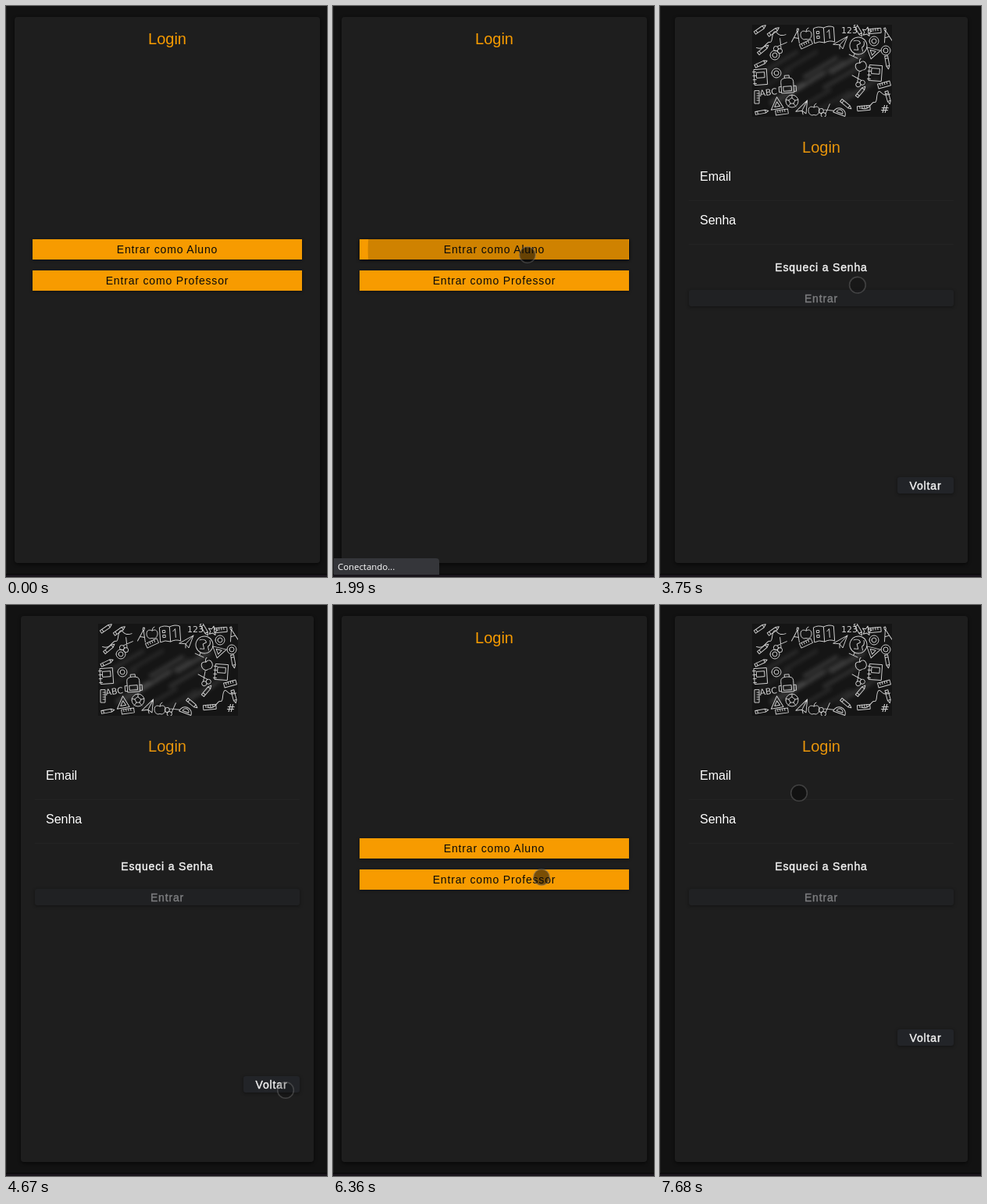
Recreate the animation shown at these times as an HTML page. Size 411 by 732 pixels, loop 8 s.

```html
<!DOCTYPE html>
<html lang="pt">
<head>
<meta charset="utf-8">
<title>Login</title>
<style>
html, body { margin: 0; width: 100%; height: 100%; overflow: hidden; background: #121212; }
svg { display: block; }
text { font-family: "Liberation Sans", Arial, sans-serif; }
.btn { font-size: 14px; letter-spacing: .84px; text-anchor: middle; }
.bold { stroke: currentColor; stroke-width: .4px; fill: currentColor; }
.title { font-size: 20px; text-anchor: middle; }
.field { font-size: 16px; fill: #fff; }
.status { font-family: "Open Sans", "Noto Sans", sans-serif; font-size: 11.4px; fill: #fff; }
.chalk path { fill: none; stroke: #d2d2d2; stroke-width: .95; stroke-linejoin: round; stroke-linecap: round; }
.chalk text { fill: #d2d2d2; font-size: 11px; font-family: "DejaVu Sans", sans-serif; }
</style>
</head>
<body>
<svg id="stage" width="100%" height="100%" viewBox="0 0 411 732">
  <defs>
    <clipPath id="view"><rect width="411" height="728"/></clipPath>
    <clipPath id="board"><rect width="179" height="118"/></clipPath>
    <filter id="shade" x="-20%" y="-60%" width="140%" height="220%"><feGaussianBlur stdDeviation="2"/></filter>
    <filter id="smudge" x="-30%" y="-30%" width="160%" height="160%"><feGaussianBlur stdDeviation="2.4"/></filter>
  </defs>
  <rect width="411" height="732" fill="#121212"/>
  <g id="pages" clip-path="url(#view)"></g>
  <rect width="1" height="728" fill="#1d1d1d"/>
  <rect y="728" width="411" height="1" fill="#070707"/>
  <rect y="729" width="411" height="3" fill="#19151b"/>
  <g id="status">
    <path d="M1 708H132Q136 708 136 712V729H1Z" fill="#35363a"/>
    <text class="status" x="6" y="723">Conectando...</text>
  </g>
  <circle id="cursor" r="10.3" fill="#080808" stroke="#777" stroke-opacity=".42" stroke-width="1.6"/>
</svg>
<script>
const LOOP = 8000;
const $ = id => document.getElementById(id);

function el(parent, tag, attrs, text) {
  const node = document.createElementNS('http://www.w3.org/2000/svg', tag);
  for (const k in attrs) node.setAttribute(k, attrs[k]);
  if (text) node.textContent = text;
  return parent.appendChild(node);
}
const set = (node, attrs) => { for (const k in attrs) node.setAttribute(k, attrs[k]); };
const clamp = v => Math.max(0, Math.min(1, v));
const smooth = v => v * v * (3 - 2 * v);
const lerp = (a, b, p) => a + (b - a) * p;

// CSS-like cubic-bezier timing, solved by bisection
function bezier(x1, y1, x2, y2) {
  const at = (a, b, s) => 3 * a * s * (1 - s) ** 2 + 3 * b * s * s * (1 - s) + s ** 3;
  return x => {
    if (x <= 0 || x >= 1) return clamp(x);
    let lo = 0, hi = 1;
    for (let i = 0; i < 24; i++) {
      const mid = (lo + hi) / 2;
      if (at(x1, x2, mid) < x) lo = mid; else hi = mid;
    }
    return at(y1, y2, lo);
  };
}
const enterEase = bezier(.36, .66, .04, 1);
const rippleEase = bezier(.4, 0, .2, 1);

function page(x, w) {
  const g = el($('pages'), 'g', {});
  el(g, 'rect', { width: 411, height: 728, fill: '#121212' });
  el(g, 'rect', { x, y: 15, width: w, height: 701, rx: 4, fill: '#000', opacity: .55, filter: 'url(#shade)' });
  el(g, 'rect', { x, y: 14, width: w, height: 700, rx: 4, fill: '#1e1e1e' });
  return g;
}

function button(parent, x, y, w, h, label, look) {
  const g = el(parent, 'g', { transform: `translate(${x} ${y})` });
  const shadow = el(g, 'rect', { y: 1, width: w, height: h, fill: '#000', opacity: .4, filter: 'url(#shade)' });
  el(g, 'rect', { width: w, height: h, rx: look.rx, fill: look.fill });
  const box = el(g, 'svg', { width: w, height: h, overflow: 'hidden' });
  const wave = el(box, 'circle', { fill: look.wave, opacity: 0 });
  el(g, 'text', { class: 'btn ' + look.css, x: w / 2, y: h / 2 + 5, fill: look.ink, color: look.ink }, label);
  return { g, x, y, w, h, shadow, wave };
}

// Blackboard banner
const shapes = {
  pencil: 'M-8-2H5L9 0 5 2H-8ZM-5-2V2M5-2V2',
  ruler: 'M-8-3H8V3H-8ZM-5-3V0M-2-3V0M1-3V0M4-3V0',
  compass: 'M-5 9L0-6 5 9M-3 3H3M-1-6V-9H1V-6',
  apple: 'M0-3C-9-8-9 7-2 7Q0 6 2 7C9 7 9-8 0-3Q0-7 3-8',
  book: 'M0-9Q-7-12-13-9V10Q-7 7 0 10 7 7 13 10V-9Q7-12 0-9V10M-9-5h3v3h-3zM-9 1h3v3h-3zM4-3L7-6V5',
  note: 'M-8-10H8V10H-8ZM-5-6H5V1H-5ZM-10-7h4M-10-2h4M-10 3h4M-10 8h4',
  ball: 'M-8 0A8 8 0 1 1 8 0 8 8 0 1 1-8 0M0-4L4-1 2 3H-2L-4-1ZM0-8V-4M8-2 4-1M5 7 2 3M-5 7-2 3M-8-2-4-1',
  globe: 'M-11 0A11 11 0 1 1 11 0 11 11 0 1 1-11 0M-8-3Q-3-8 1-4L-2 0 2 5-3 7M4-8Q8-3 5 0L8 4M0 11V15M-6 15H6',
  pack: 'M-8 10V-4Q-8-9 0-9T8-4V10ZM-5 2H5V8H-5ZM-3-9V-12H3V-9M-8 2h-3v7h3M8 2h3v7h-3',
  scissors: 'M-5-8 3 3M5-8-3 3M3 3a3 3 0 1 0 3 3 3 3 0 0 0-3-3M-3 3a3 3 0 1 1-3 3 3 3 0 0 1 3-3',
  square: 'M-8 7L2-8 8 7ZM-3 4L1-2 4 4Z',
  plane: 'M-9 2L9-8 3 8-1 3ZM9-8L-1 3V8',
  ring: 'M-6 0A6 6 0 1 1 6 0 6 6 0 1 1-6 0M-3 0A3 3 0 1 1 3 0 3 3 0 1 1-3 0',
  arc: 'M-8 5A8 8 0 0 1 8 5ZM-4 3A4 4 0 0 1 4 3Z',
  star: 'M0-6L2-2 6-2 3 1 4 5 0 3-4 5-3 1-6-2-2-2Z',
  curl: 'M-20 6C-10 12-6 0-2 2S2-8 6-10 8-2 20-4'
};
const spots = {
  pencil: [[10, 6, -35], [27, 9, -35], [14, 32, -40], [11, 50, -25], [12, 112, -10], [120, 102, 40], [136, 7, 60], [173, 48, 80], [139, 86, -50], [174, 93, 75]],
  ruler: [[69, 25, -25], [157, 8, -5], [38, 112, -8], [143, 107, -5], [169, 77, -15], [6, 93, 90]],
  compass: [[57, 14, 10], [172, 13, -15]],
  apple: [[69, 12, 0], [79, 109, 0], [139, 52, -20]],
  book: [[92, 13, -4]],
  note: [[11, 67, -4], [158, 62, 4]],
  ball: [[51, 98, 0]],
  globe: [[136, 27, 25]],
  pack: [[45, 77, -4]],
  scissors: [[36, 27, 30], [136, 70, -25], [95, 110, 60]],
  square: [[31, 101, -10], [156, 34, 70]],
  plane: [[113, 23, 0], [64, 107, -15]],
  ring: [[29, 39, 0], [156, 21, 0], [31, 62, 0], [171, 33, 0]],
  arc: [[113, 110, 20]],
  star: [[147, 9, 10]],
  curl: [[24, 20, -10], [158, 97, -12]]
};

function board(parent) {
  const g = el(parent, 'g', { class: 'chalk', transform: 'translate(118 24)', 'clip-path': 'url(#board)' });
  el(g, 'rect', { width: 179, height: 118, fill: '#151515' });
  const dust = el(g, 'g', { filter: 'url(#smudge)' });
  for (let i = 0; i < 14; i++) {
    const x = 28 + i * 8.5, y = 72 - 26 * Math.sin(i * 1.9);
    el(dust, 'line', {
      x1: x - 22, y1: y + 13, x2: x + 22, y2: y - 13,
      stroke: '#656565', 'stroke-width': 3 + i % 3 * 2, opacity: .22 + i % 4 * .06
    });
  }
  for (const name in spots)
    for (const [x, y, a] of spots[name])
      el(g, 'path', { d: shapes[name], transform: `translate(${x} ${y}) rotate(${a})` });
  el(g, 'text', { x: 114, y: 11 }, '123');
  el(g, 'text', { x: 10, y: 92, transform: 'rotate(-8 10 92)' }, 'ABC');
  el(g, 'text', { x: 164, y: 113, style: 'font-size:14px' }, '#');
}

const home = page(11, 391);
el(home, 'text', { class: 'title', x: 206.5, y: 49, fill: '#f79b00' }, 'Login');
const solid = { fill: '#f79b00', ink: '#0a0a0a', wave: '#000', rx: 0, css: '' };
const student = button(home, 34, 299, 345, 26, 'Entrar como Aluno', solid);
const teacher = button(home, 34, 339, 345, 26, 'Entrar como Professor', solid);

const form = page(19, 375);
board(form);
el(form, 'text', { class: 'title', x: 206.5, y: 188, fill: '#e8950b' }, 'Login');
[['Email', 224], ['Senha', 280]].forEach(([label, y]) => {
  el(form, 'text', { class: 'field', x: 51, y }, label);
  el(form, 'rect', { x: 37, y: y + 25, width: 339, height: 1, fill: '#232323' });
});
el(form, 'text', { class: 'btn bold', x: 206.5, y: 340, color: '#f4f4f4' }, 'Esqueci a Senha');
const dark = { fill: '#222428', ink: '#f4f4f4', wave: '#fff', rx: 3, css: 'bold' };
button(form, 37, 364, 339, 21, 'Entrar', { ...dark, fill: '#202123', ink: '#7c7d7f' });
const back = button(form, 304, 604, 72, 21, 'Voltar', dark);

const visits = [[-1000, home], [2070, form], [5386, home], [6650, form]];
const taps = [[student, 1855, 249, 319], [back, 5285, 362, 607], [teacher, 6500, 267, 349]];
const loads = [[1960, 2480], [5400, 5960], [6600, 7080]];
const track = [
  [370, 328, 644], [1120, 250, 319], [1190, 249, 319], [3210, 249, 319], [3420, 246, 335],
  [3610, 246, 335], [4460, 340, 644], [4670, 358, 622], [4950, 362, 607], [5660, 362, 607],
  [5960, 279, 371], [6150, 279, 371], [6360, 267, 349], [6980, 267, 349], [7680, 178, 241]
];

function showPages(t) {
  const [start, top] = visits.filter(v => v[0] <= t).pop();
  const p = enterEase((t - start) / 280);
  const under = top === home ? form : home;
  if ($('pages').lastChild !== top) $('pages').appendChild(top);
  set(under, { transform: '', opacity: 1 });
  set(top, { transform: `translate(0 ${40 * (1 - p)})`, opacity: lerp(.01, 1, p) });
  back.g.setAttribute('transform', `translate(304 ${t > 6200 ? 544 : 604})`);
}

function showTap(t, [b, start, px, py]) {
  const age = t - start;
  const p = rippleEase(age / 225);
  const on = age >= 0 && age < 600;
  set(b.wave, {
    cx: lerp(px - b.x, b.w / 2, p),
    cy: lerp(py - b.y, b.h / 2, p),
    r: lerp(b.w / 4, (Math.hypot(b.w, b.h) + 10) / 2, p),
    opacity: on ? .16 * clamp(age / 75) : 0
  });
  b.shadow.setAttribute('opacity', on ? lerp(.4, .9, clamp(age / 135)) : .4);
}

function showCursor(t) {
  let i = track.findIndex(k => k[0] > t);
  if (i < 0) i = track.length;
  const a = track[Math.max(0, i - 1)], b = track[Math.min(i, track.length - 1)];
  const p = b[0] > a[0] ? smooth(clamp((t - a[0]) / (b[0] - a[0]))) : 0;
  const light = t < 1720 || (t > 3280 && t < 5280);
  set($('cursor'), {
    cx: lerp(a[1], b[1], p),
    cy: lerp(a[2], b[2], p),
    'fill-opacity': light ? .25 : .52,
    visibility: t < 370 ? 'hidden' : 'visible'
  });
}

function draw(t) {
  showPages(t);
  taps.forEach(tap => showTap(t, tap));
  const load = loads.find(([a, b]) => t >= a && t < b);
  $('status').setAttribute('opacity', load ? clamp((load[1] - t) / 140) : 0);
  showCursor(t);
}

const began = performance.now();
function tick() {
  draw((performance.now() - began) % LOOP);
  requestAnimationFrame(tick);
}
tick();
</script>
</body>
</html>
```
